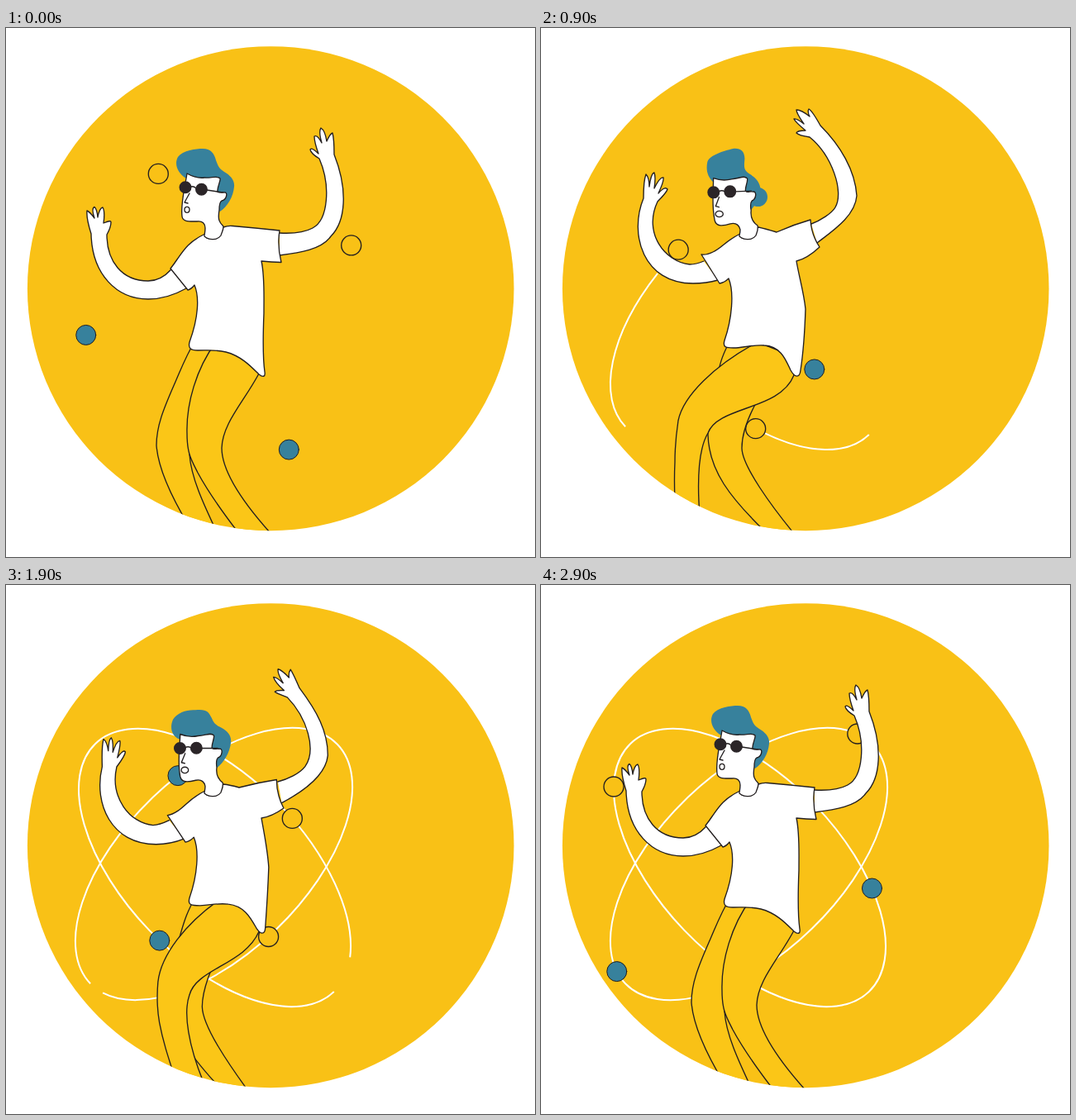
Animation, 640 px wide and 640 px high, one loop 3 s. Source, as an HTML page:

```html
<!DOCTYPE html>
<html lang="en">
<head>
<meta charset="utf-8">
<title>Dancer</title>
<style>
  html, body { margin: 0; height: 100%; overflow: hidden; background: #fff; }
  svg { display: block; width: 100vw; height: 100vh; }
  .line { stroke: #231f20; stroke-width: 1.35; stroke-linejoin: round; stroke-linecap: round; }
  .none { fill: none; }
  .skin { fill: #fff; }
  .pants { fill: #fbc617; }
  .hair { fill: #37819c; }
  .dark { fill: #2b2528; }
  .hollow { fill: #f9c116; }
  .ball { stroke-width: 1; }
  .trail { fill: none; stroke: #fff; stroke-width: 2; }
</style>
</head>
<body>
<svg viewBox="0 0 640 640">
  <clipPath id="disc"><ellipse cx="320.2" cy="315.2" rx="294.3" ry="293"/></clipPath>
  <ellipse cx="320.2" cy="315.2" rx="294.3" ry="293" fill="#f9c116"/>
  <!-- Arc radii give only the ratio; they grow to span the end points -->
  <path id="orbitA" class="trail" pathLength="1" d="M396.8 492A20.8 10.95 46.1 0 1 108.2 192A20.8 10.95 46.1 0 1 396.8 492"/>
  <path id="orbitB" class="trail" pathLength="1" d="M102.1 482.2A20.8 10.94 -44.1 0 1 400.9 192.8A20.8 10.94 -44.1 0 1 102.1 482.2"/>
  <g id="balls"></g>
  <g id="figure" clip-path="url(#disc)"></g>
</svg>
<script>
const LOOP = 3000, STEP = 100;
const $ = id => document.getElementById(id);

function add(parent, tag, cls, attrs = {}) {
  const el = document.createElementNS('http://www.w3.org/2000/svg', tag);
  el.setAttribute('class', cls);
  set(el, attrs);
  return $(parent).appendChild(el);
}
function set(el, attrs) {
  for (const key in attrs) el.setAttribute(key, attrs[key]);
}

const clamp = x => Math.min(1, Math.max(0, x));
const ease = (t, start, length) => (1 - Math.cos(Math.PI * clamp((t - start) / length))) / 2;
const bump = (t, peak, width) => Math.max(0, 1 - Math.abs(t - peak) / width);

// Blend two path strings that share the same commands
const NUMBER = /-?\d+(\.\d+)?/g;
function mix(a, b, p) {
  const to = b.match(NUMBER);
  let i = 0;
  return a.replace(NUMBER, n => +(+n + (to[i++] - n) * p).toFixed(2));
}
// Quadratic blend through a middle pose
const bend = (a, mid, b, p) => mix(mix(a, mid, 2 * p), mix(mid, b, 2 * p - 1), p);

// How far each part has swung from its first pose to its second
const swing = {
  leg: t => ease(t, 0, 690) - ease(t, 1245, 1660),
  backLeg: t => ease(t, 0, 900) - ease(t, 1400, 1440),
  left: t => ease(t, 0, 700) - ease(t, 1400, 1440),
  right: t => ease(t, 0, 770) - ease(t, 1400, 1440),
  head: t => ease(t, 0, 1060) - ease(t, 1450, 1350),
};

const parts = [];
function part(cls, move, a, b, mid) {
  parts.push({ el: add('figure', 'path', cls), move, a, b, mid });
}

part('line pants', swing.backLeg,
  'M230 376C217 398 212 412 205 428C190 462 182 482 182 505C184 533 200 567 221 602L256 612C240 578 224 545 222 516C222 490 240 440 262 400L256 374Z',
  'M230 376C219 396 217 405 214 418C207 445 202 470 202 492C203 535 228 568 275 613L308 614C280 580 243 530 243 508C243 490 252 468 262 450L257 374Z');
part('line pants', swing.leg,
  'M254 380C230 412 218 455 219 490C219 515 224 522 232 538C246 564 264 589 290 622L330 622C285 574 261 535 261 508C262 478 288 452 306 418L300 395Z',
  'M262 380C210 408 172 445 166 475C163 495 162 510 162 525C161 545 161 560 163 590L192 590C189 550 190 510 202 490C214 457 289 463 306 420L300 395Z');
part('line skin', swing.left,
  'M200 292C190 303 180 306 172 306C140 306 122 282 122 250Q127 241 127 235Q127 232 118 236Q120 222 117 217Q113 218 111 229Q110 219 107 216.5Q103 218 107 230Q101 222 98 221Q97 230 103 249C104 298 134 328 172 328Q195 328 218 315',
  'M197 282C190 285 184 286 180 286C150 283 123 248 141 210Q152 199 153 195Q150 191 142 200Q149 185 148 181Q144 180 137 194Q139 180 137 175Q133 176 131 192Q131 181 127 177Q124 185 124 206C106 250 124 309 184 309Q200 309 214 305',
  'M198 287C190 292 184 295 176 295C148 293 126 265 129 229Q138 215 138 210Q136 207 129 217Q132 199 130 196Q126 197 123 210Q123 197 120 194Q117 196 118 209Q115 198 111 196Q109 205 111 230C105 276 130 318 179 318Q198 318 217 309');
part('line skin', swing.right,
  'M331 248C350 249 362 247 371 242C390 232 393 190 379 158Q369 152 368 147Q370 144 378 152Q373 138 373 131Q377 129 382 139Q378 125 381 121Q386 124 388 137Q392 128 395 127Q397 134 397 153C414 196 411 234 393 252C382 268 355 272 331 275',
  'M327 237C338 233 352 224 356 217C367 198 352 154 325 132Q312 130 309 127Q310 124 320 124Q308 114 306 110Q309 109 318 116Q309 103 309 99Q315 99 325 107Q322 101 324 98Q328 100 338 118C362 142 380 172 382 203C380 228 352 246 334 260',
  'M330 240C343 238 358 233 366 224C382 205 374 168 353 141Q341 135 339 133Q341 131 350 133Q340 122 339 115Q343 115 350 123Q344 110 346 106Q350 108 357 118Q358 111 361 108Q364 115 369 132C388 164 397 188 393 215C389 238 362 255 333 267');
part('line skin', swing.left,
  'M241 249C222 258 216 267 207 280Q203 286 199 291L220 317Q224 316 228 311C234 325 233 350 222 380C220 388 224 390 232 390C245 390 255 389 266 392C285 397 297 410 306 419C311 423 314 422 313 416C310 395 311 370 312 345C312 320 313 300 309 282Q321 283 333 283.5Q328 264 331 245Q303 242 274 239.5Q268 239 263 241Z',
  'M241 249C224 257 219 266 208 271Q200 275 194 274L216 309Q222 308 227 303C234 320 231 352 222 378C219 388 226 387 236 387C250 386 258 383 270 384C290 385 296 401 302 414C307 423 313 424 314 414C317 395 319 370 320 340C318 320 312 300 309 282Q322 279 337 265Q327 250 326 232Q305 238 285 247Q272 243 263 241Z');

const bun = add('figure', 'circle', 'hair');
const curl = add('figure', 'circle', 'hair');
const hair = add('figure', 'path', 'hair');
const hairRest = 'M218 182C208 176 203 165 208 156C214 148 230 146 238 146C248 146 252 152 254 160C257 168 258 170 264 174C271 178 277 184 276 192C275 204 268 216 259 222L240 200Z';
const hairTall = 'M208 187C201 180 199 172 201 162C204 154 220 149 232 146C241 145 246 149 246 158C245 168 244 172 252 177C260 182 264 187 265 195C266 205 258 214 254 220L235 200Z';
const hairWide = 'M207 188C198 185 196 175 200 165C205 156 216 152 226 153C241 151 243 154 247 161C250 168 253 169 259 172C267 176 271 181 271 189C269 204 262 214 254 221L232 203Z';

part('line skin', swing.head,
  'M219 176C217 190 211 212 213 228C214 235 222 234 231 234C238 233 241 237 241 242C241 247 240 249 240 252C245 257 256 257 260 251C261 247 263 245 263 240C258 235 256 232 258 220C258 214 259 210 261 209C267 208 269 198 264 199C260 198 257 200 256 198C255 193 260 185 259 182C256 178 248 182 240 181C232 182 226 180 219 176Z',
  'M208 182C208 198 206 214 210 233C212 241 220 240 229 237C237 235 240 240 241 244C241 248 240 250 240 252C245 257 256 257 260 251C261 247 263 245 262 239C256 235 253 229 254 221C253 216 253 211 255 209C260 207 261 197 256 198C252 197 249 200 247 197C246 193 250 186 249 182C245 178 240 182 230 183C222 185 214 184 208 182Z');
// Bridge, temple and nose
part('line none', swing.head,
  'M224 192Q227 191 230 194M243 196L262 199M222 200L216 211L220 212',
  'M215 198Q218 196 222 198M235 198L254 197M215 205L211 216L215 217');
part('dark', swing.head,
  'M209.5 192.7a7.5 7.5 0 1 0 15 0a7.5 7.5 0 1 0 -15 0M229 195.2a7.5 7.5 0 1 0 15 0a7.5 7.5 0 1 0 -15 0',
  'M200.8 199.2a7.5 7.5 0 1 0 15 0a7.5 7.5 0 1 0 -15 0M220.8 198a7.5 7.5 0 1 0 15 0a7.5 7.5 0 1 0 -15 0');
part('line skin', swing.head,
  'M216 219.8a3 3.5 0 1 0 6 0a3 3.5 0 1 0 -6 0',
  'M210.8 225.3a4.7 3.5 0 1 0 9.4 0a4.7 3.5 0 1 0 -9.4 0');

// Turns travelled by each ball at the key times
const keyTimes = [0, 500, 900, 1300, 1600, 2100, 2500, 2900];
const balls = [
  { orbit: 'orbitA', cls: 'hollow', start: .579, turns: [0, .321, .564, .865, 1, 1.321, 1.564, 1.865] },
  { orbit: 'orbitA', cls: 'hair ball', start: .0577, turns: [0, .334, .58, .8125, .996, 1.295, 1.58, 1.8125] },
  { orbit: 'orbitB', cls: 'hollow', start: .5732, turns: [0, .317, .664, .905, 1, 1.317, 1.664, 1.905] },
  { orbit: 'orbitB', cls: 'hair ball', start: .1146, turns: [0, .296, .631, .903, 1, 1.296, 1.631, 1.903] },
];
for (const b of balls) b.el = add('balls', 'circle', 'line ' + b.cls, { r: 12 });

function travelled(turns, t) {
  let i = 0;
  while (i < turns.length - 2 && t > keyTimes[i + 1]) i++;
  const p = (t - keyTimes[i]) / (keyTimes[i + 1] - keyTimes[i]);
  return turns[i] + (turns[i + 1] - turns[i]) * p;
}

function draw(t) {
  set($('orbitA'), { 'stroke-dasharray': ease(t, 520, 1600) + ' 2' });
  set($('orbitB'), { 'stroke-dasharray': ease(t, 423, 1617) + ' 2' });
  for (const { el, orbit, start, turns } of balls) {
    const path = $(orbit);
    const at = (start + travelled(turns, t)) % 1;
    const { x, y } = path.getPointAtLength(at * path.getTotalLength());
    set(el, { cx: x, cy: y });
  }
  for (const { el, move, a, b, mid } of parts) {
    const p = move(t);
    set(el, { d: mid ? bend(a, mid, b, p) : mix(a, b, p) });
  }
  const swept = mix(hairTall, hairWide, ease(t, 950, 500));
  set(hair, { d: mix(hairRest, swept, swing.head(t)) });
  const out = bump(t, 900, 400), back = bump(t, 2500, 400);
  set(bun, { cx: 248 + 14.5 * out, cy: 204.5, r: 11.5 * out });
  set(curl, { cx: 222 - 13.5 * back, cy: 184.5, r: 12 * back });
}

function tick(now) {
  draw(Math.floor(now % LOOP / STEP) * STEP);
  requestAnimationFrame(tick);
}
draw(0);
requestAnimationFrame(tick);
</script>
</body>
</html>
```
